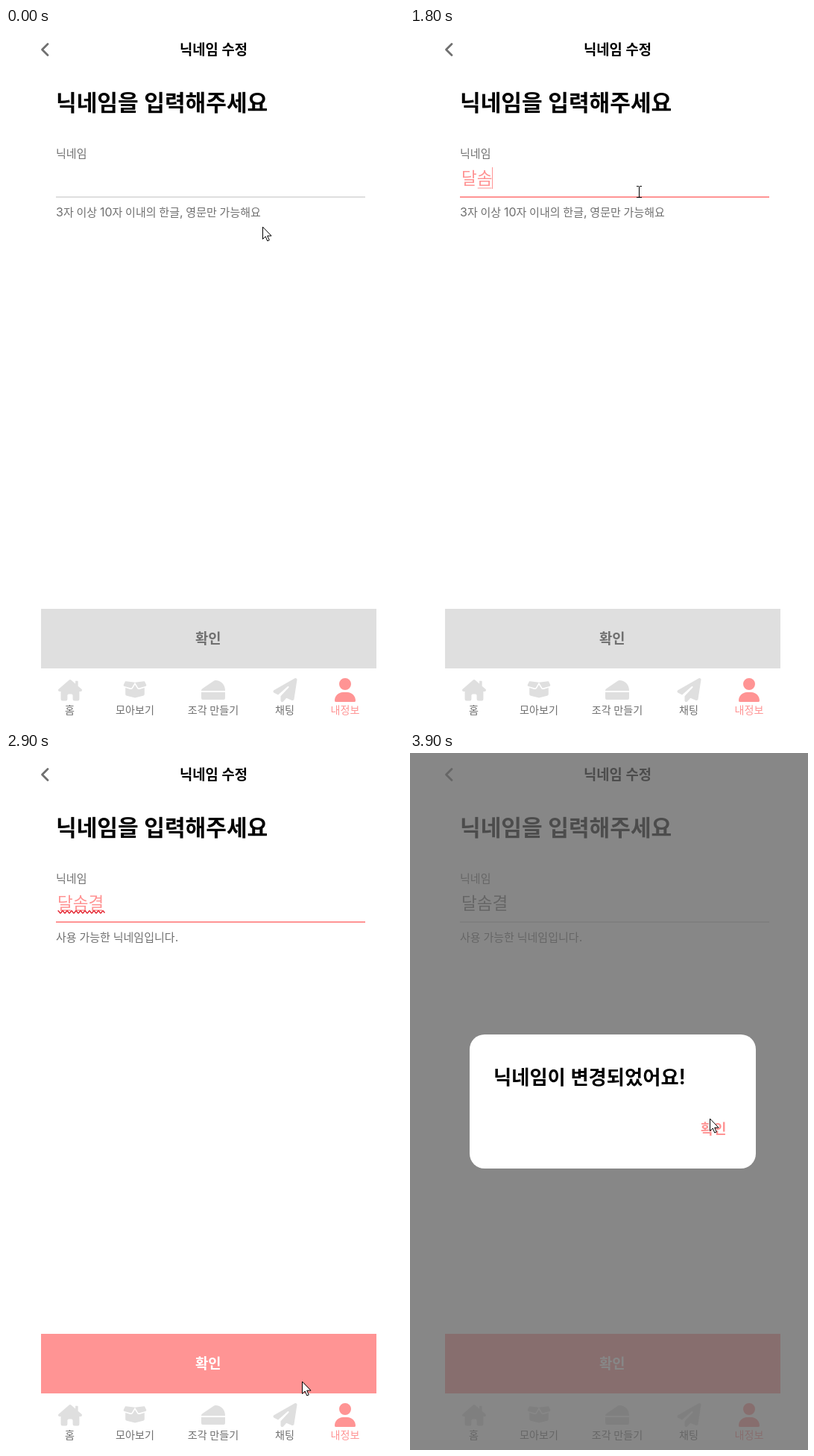
These frames come from a looping animation (534x936 px, 4100 ms). An HTML page with a canvas:

```html
<!DOCTYPE html>
<html lang="ko">
<head>
<meta charset="utf-8">
<title>닉네임 수정</title>
<style>
html, body { margin: 0; width: 100%; height: 100%; overflow: hidden; background: #fff; }
canvas { display: block; width: 534px; height: 936px; }
</style>
</head>
<body>
<canvas id="stage"></canvas>
<script>
const W = 534, H = 936, LOOP = 4100, STEP = 100;
const PINK = '#ff9494', PALE = '#dfdfdf', GREY = '#707070', BLACK = '#000';
const canvas = document.getElementById('stage');
const ctx = canvas.getContext('2d');
const dpr = window.devicePixelRatio || 1;
canvas.width = W * dpr;
canvas.height = H * dpr;

const ICONS = {
  house: new Path2D('M266 8q22-16 44 0L568 236q8 8 8 20 0 32-32 32h-32v184q0 40-40 40h-80q-40 0-40-40v-88q0-32-32-32h-64q-32 0-32 32v88q0 40-40 40h-80q-40 0-40-40V288H32Q0 288 0 256q0-12 8-20zM416 32h48q16 0 16 16v120l-64-56z'),
  box: new Path2D('M59 42q5-10 16-9L320 64 565 33q11-1 16 9l42 84c9 18-1 39-20 45L440 217q-24 6-37-14L320 64 237 203q-13 20-37 14L37 171c-19-6-29-27-20-45zM321 128l55 91c15 25 45 37 72 29l128-36v167q0 36-36 46l-204 51q-16 4-32 0l-204-51q-36-10-36-46V212l128 36c27 8 57-4 72-29l55-91z'),
  cake: new Path2D('M512 240v16H0q0-32 27-50L275 41q14-9 29-9c115 0 208 93 208 208zM512 288v128q0 32-32 32H32q-32 0-32-32V288z'),
  plane: new Path2D('M498 6q16 11 14 31l-64 416c-3 20-24 33-44 25l-120-50-68 74c-20 21-56 8-56-22v-84q0-6 4-11L332 203c14-15-6-37-22-23L106 361l-88-44C-5 305-6 272 16 260L464 4q18-9 34 2z'),
  user: new Path2D('M224 256A128 128 0 1 0 224 0a128 128 0 1 0 0 256zM178 304C80 304 0 384 0 482q0 30 30 30h388q30 0 30-30c0-98-80-178-178-178z')
};
const ARROW = new Path2D('M.5.5v16l3.7-3.5 2.6 6 2.5-1.1-2.6-5.8h5z');

// tick, x, y of the pointer's hot spot
const PATH = [
  [0, 344, 267], [1, 322, 238], [2, 307, 220], [22, 307, 220], [23, 314, 262],
  [24, 372, 640], [25, 397, 887], [26, 397, 903], [27, 397, 870], [28, 397, 840],
  [29, 397, 844], [30, 397, 844], [31, 397, 831], [33, 397, 831], [34, 402, 780],
  [35, 424, 620], [36, 427, 521], [37, 415, 506], [38, 405, 494], [39, 402, 491]
];
const TYPED = ['ㄷ', '다', '달', '달소', '달솜', '달솜겨', '달솜결'];

function rect(x, y, w, h, color) {
  ctx.fillStyle = color;
  ctx.fillRect(x, y, w, h);
}

// Hangul and Latin use different faces; a run is [string, font, width].
function runs(str, size, weight) {
  return str.match(/[가-힣ㄱ-ㅣ]+| |[^가-힣ㄱ-ㅣ ]+/g).map(part => {
    const hangul = /[가-힣ㄱ-ㅣ]/.test(part);
    const font = hangul
      ? `${weight} ${size * 0.94}px "Noto Sans CJK KR", "Noto Sans CJK", sans-serif`
      : `${weight} ${size}px Inter, sans-serif`;
    ctx.font = font;
    return [part, font, part === ' ' ? size * 0.235 : ctx.measureText(part).width];
  });
}

function text(str, x, midY, size, weight, color, centered) {
  const parts = runs(str, size, weight);
  const width = parts.reduce((sum, p) => sum + p[2], 0);
  if (centered) x -= width / 2;
  ctx.fillStyle = color;
  for (const [part, font, w] of parts) {
    ctx.font = font;
    ctx.fillText(part, x, midY + size * 0.357);
    x += w;
  }
  return width;
}

function icon(name, x, y, scale, color) {
  ctx.save();
  ctx.translate(x, y);
  ctx.scale(scale, scale);
  ctx.fillStyle = color;
  ctx.fill(ICONS[name]);
  ctx.restore();
}

function header() {
  ctx.strokeStyle = GREY;
  ctx.lineWidth = 2.8;
  ctx.lineCap = ctx.lineJoin = 'round';
  ctx.beginPath();
  ctx.moveTo(56, 21.5);
  ctx.lineTo(48.5, 29);
  ctx.lineTo(56, 36.5);
  ctx.stroke();
  text('닉네임 수정', 233, 28.5, 20, 600, BLACK);
  text('닉네임을 입력해주세요', 67, 99.5, 32, 700, BLACK);
}

function squiggle(x, width) {
  ctx.strokeStyle = '#e3202c';
  ctx.lineWidth = 1.4;
  ctx.beginPath();
  for (let i = 0; i <= width; i++) {
    ctx.lineTo(x + i, 213.5 - 1.6 * Math.cos(i * Math.PI / 3));
  }
  ctx.stroke();
}

function caretOn(n) {
  if (n < 4 || n >= 32) return false;
  if (n >= 14 && n < 23) return true;
  return (n < 7) || (n >= 9 && n < 12) || (n >= 25 && n < 28) || n === 31;
}

function field(n) {
  const focused = n >= 4 && n < 32;
  const valid = n >= 19;
  const line = n === 4 ? '#efbaba' : focused || n === 32 ? PINK : PALE;
  text('닉네임', 67, 168, 16, 400, GREY);
  rect(67, 226, 415, 2, line);
  text(valid ? '사용 가능한 닉네임입니다.' : '3자 이상 10자 이내의 한글, 영문만 가능해요',
    67, 247, 16, 400, GREY);

  let width = 0;
  if (n >= 14) {
    const value = TYPED[Math.min(n - 14, TYPED.length - 1)];
    width = text(value, 69, 201, 24, 400, focused ? PINK : GREY);
    if (n < 23) {
      const last = width / value.length;
      rect(69 + width - last + 1, 214.5, last - 2, 1, PINK);
    } else if (focused) {
      squiggle(70, width);
    }
  }
  if (caretOn(n)) rect(Math.round(69 + width), 187, 1, 29, PINK);
}

function footer(valid) {
  rect(47, 780, 450, 80, valid ? PINK : PALE);
  text('확인', 254, 819.5, 20, 600, valid ? '#fff' : GREY);
  icon('house', 70, 875, 1 / 18, PALE);
  icon('box', 157, 875.5, 1 / 20, PALE);
  icon('cake', 262, 874, 1 / 16, PALE);
  icon('plane', 358.5, 873, 1 / 16, PALE);
  icon('user', 441, 873, 1 / 16, PINK);
  const labels = [['홈', 85.5], ['모아보기', 173], ['조각 만들기', 278], ['채팅', 374], ['내정보', 455]];
  labels.forEach(([label, x], i) => text(label, x, 915.5, 15, 500, i === 4 ? PINK : GREY, true));
}

function modal() {
  rect(0, 0, W, H, 'rgba(100,100,100,.77)');
  ctx.fillStyle = '#fff';
  ctx.beginPath();
  ctx.roundRect(80, 378, 384, 180, 20);
  ctx.fill();
  text('닉네임이 변경되었어요!', 112, 435, 28, 600, BLACK);
  text('확인', 390, 504.5, 20, 600, PINK);
}

function pointerAt(n) {
  let i = PATH.length - 1;
  while (PATH[i][0] > n) i--;
  const a = PATH[i], b = PATH[i + 1] || a;
  const k = b === a ? 0 : (n - a[0]) / (b[0] - a[0]);
  return [a[1] + (b[1] - a[1]) * k, a[2] + (b[2] - a[2]) * k];
}

function pointer(n) {
  const [x, y] = pointerAt(n).map(Math.round);
  if (n >= 2 && n < 23) {
    rect(x, y - 7, 1, 15, BLACK);
    for (const end of [y - 8, y + 7]) {
      rect(x - 3, end, 3, 1, BLACK);
      rect(x + 1, end, 3, 1, BLACK);
    }
    return;
  }
  ctx.save();
  ctx.translate(x, y);
  ctx.lineJoin = 'miter';
  ctx.lineWidth = 1;
  ctx.fillStyle = '#fff';
  ctx.strokeStyle = BLACK;
  ctx.fill(ARROW);
  ctx.stroke(ARROW);
  ctx.restore();
}

function draw(n) {
  ctx.setTransform(dpr, 0, 0, dpr, 0, 0);
  rect(0, 0, W, H, '#fff');
  header();
  field(n);
  footer(n >= 19);
  if (n >= 33) modal();
  pointer(n);
}

const start = performance.now();
function frame() {
  const t = (performance.now() - start) % LOOP;
  draw(Math.floor(t / STEP));
  requestAnimationFrame(frame);
}
frame();
</script>
</body>
</html>
```
